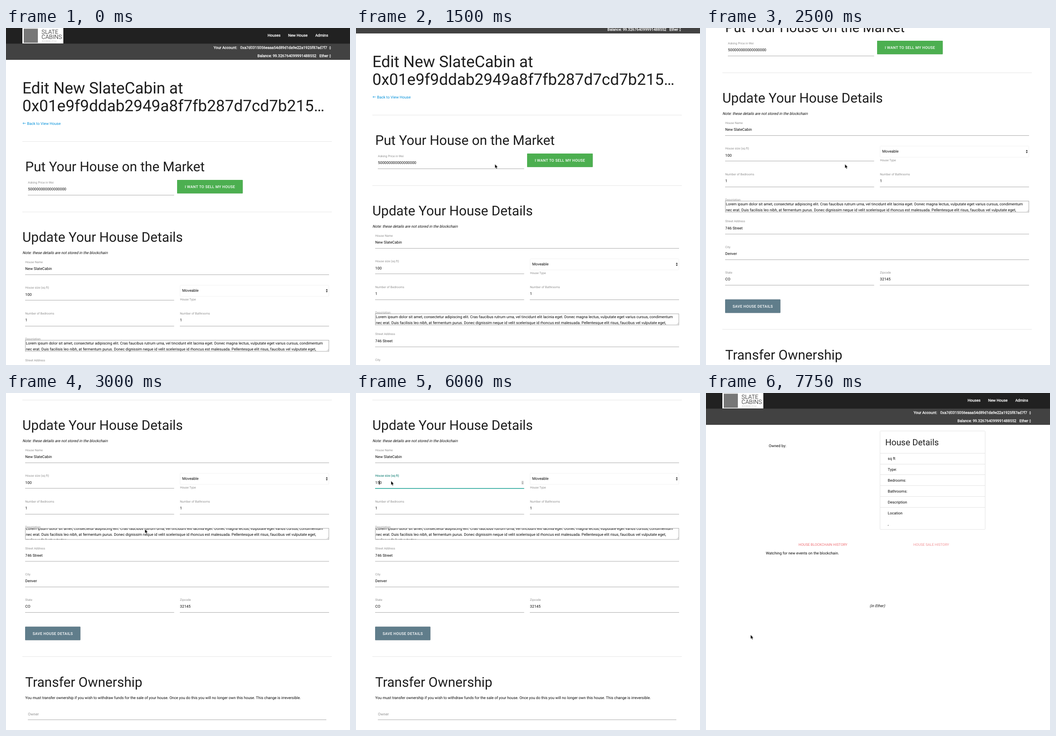
Animation of 756 by 741 pixels, one loop 8 s. Source, as an HTML page:

```html
<!DOCTYPE html>
<html lang="en">
<head>
<meta charset="utf-8">
<title>Edit house</title>
<style>
html, body { margin: 0; width: 100%; height: 100%; overflow: hidden; background: #fff; }
svg { display: block; width: 100%; height: 100%; }
text { font-family: Roboto, Arial, sans-serif; font-size: 8.333px; fill: #080808; text-rendering: geometricPrecision; white-space: pre; }
.label { font-size: 6.667px; fill: #8e8e8e; }
.hint { fill: #929292; }
.h1, .h2, .h3 { fill: #1e1e1e; }
.h1 { font-size: 35px; }
.h2 { font-size: 29.67px; }
.h3 { font-size: 19px; }
.nav { fill: #fff; stroke: #fff; stroke-width: .3px; }
.btn { fill: #fff; font-weight: 500; letter-spacing: .278px; text-anchor: middle; }
.tab { font-size: 7.78px; fill: #ee6e73; text-anchor: middle; }
.link { fill: #0290da; }
.end { text-anchor: end; }
.raised { filter: drop-shadow(0 .9px .4px rgba(0, 0, 0, .32)); }

#page, #form, #house, #pointer, #area, #focus, #caret, #zero, #five { animation: 8s step-end infinite; }
#page { animation-name: scroll; }
#form { animation-name: form; }
#house { animation-name: house; }
#pointer { animation-name: pointer; }
#area { animation-name: area; }
#focus { animation-name: focus; }
#caret { animation-name: caret; }
#zero { animation-name: zero; }
#five { animation-name: five; }

@keyframes scroll {
  0%, 96.875%, 100% { transform: translateY(0); }
  18.75% { transform: translateY(-58px); }
  21.875% { transform: translateY(-150px); }
  28.125% { transform: translateY(-238px); }
  31.25% { transform: translateY(-306px); }
  34.375% { transform: translateY(-389px); }
}
@keyframes form { 0% { opacity: 1; } 96.875%, 100% { opacity: 0; } }
@keyframes house { 0% { opacity: 0; } 96.875%, 100% { opacity: 1; } }
@keyframes area { 0% { transform: translateY(0); } 37.5%, 100% { transform: translateY(-6px); } }
@keyframes focus { 0%, 93.75%, 100% { opacity: 0; } 50% { opacity: 1; } }
@keyframes zero { 0% { opacity: 1; } 75%, 100% { opacity: 0; } }
@keyframes five { 0% { opacity: 0; } 75%, 100% { opacity: 1; } }
@keyframes caret {
  0%, 59.375%, 93.75%, 100% { opacity: 0; transform: translateX(56px); }
  53.125% { opacity: 1; transform: translateX(56px); }
  65.625%, 75%, 87.5% { opacity: 1; transform: translateX(51px); }
  71.875%, 81.25% { opacity: 0; transform: translateX(51px); }
}
@keyframes pointer {
  0% { opacity: 0; transform: translate(633px, 122px); }
  3.125% { opacity: 1; transform: translate(633px, 122px); }
  6.25% { opacity: 1; transform: translate(410px, 246px); }
  9.375% { opacity: 1; transform: translate(305.3px, 299.4px); }
  40.625% { opacity: 1; transform: translate(160px, 156px); }
  43.75% { opacity: 1; transform: translate(112px, 178px); }
  46.875% { opacity: 1; transform: translate(84px, 190px); }
  50% { opacity: 1; transform: translate(77px, 193.4px); }
  81.25% { opacity: 1; transform: translate(79px, 236px); }
  84.375% { opacity: 1; transform: translate(87px, 390px); }
  87.5% { opacity: 1; transform: translate(95px, 505px); }
  90.625%, 100% { opacity: 1; transform: translate(98px, 531.8px); }
}
</style>
</head>
<body>
<svg id="stage" viewBox="0 0 756 741"></svg>
<script>
const text = (x, y, s, cls = '') => `<text x="${x}" y="${y}" class="${cls}">${s}</text>`;
// upright letters slanted, so they keep the regular widths
const oblique = (x, y, s) => `<text transform="translate(${x} ${y}) skewX(-14)">${s}</text>`;
const rect = (x, y, w, h, fill, more = '') =>
  `<rect x="${x}" y="${y}" width="${w}" height="${h}" fill="${fill}" ${more}/>`;
const group = (id, ...parts) => `<g id="${id}">${parts.join('')}</g>`;
const rule = y => rect(36, y, 680, 1, '#e6e6e6');
const line = (x, y, right) => rect(x, y, right - x, 1, '#acacac');
const arrows = (x, y, fill) =>
  `<path fill="${fill}" d="M${x - 2} ${y - .8}h4l-2-3zM${x - 2} ${y + .8}h4l-2 3z"/>`;
const button = (x, y, w, fill, s) =>
  rect(x, y, w, 29.7, fill, 'rx="1" class="raised"') + text(x + w / 2 + .1, y + 18, s, 'btn');

// y is the row of the underline
const field = (x, y, right, label, value = '') =>
  text(x + .3, y - 25.4, label, 'label') + text(x + .3, y - 9.9, value) + line(x, y, right);

const nav = group('nav',
  rect(0, 34, 756, 36, '#424242', 'class="raised"'),
  rect(0, 0, 756, 34.4, '#212121'),
  rect(36, 0, 90, 34, '#fff'),
  rect(39, 1.5, 31, 31, '#777'),
  '<g style="font-weight:300">',
  '<text x="78" y="13" style="font-size:13px">SLATE</text>',
  '<text x="78" y="24.3" style="font-size:13px">CABINS</text></g>',
  '<text x="79" y="29.6" style="font-size:3.6px;fill:#aaa;letter-spacing:.2px">RECORDED STYLE</text>',
  text(575, 19.4, 'Houses', 'nav'),
  text(620, 19.4, 'New House', 'nav'),
  text(708, 19.4, 'Admins', 'nav end'),
  text(508, 46.3, 'Your Account:', 'nav end'),
  text(705.8, 46.3, '0xa7d0315056eaaa54d89d1da9e22a1925f87ad7f7', 'nav end'),
  arrows(712.3, 43.8, '#ddd'),
  text(682, 64.1, 'Balance: 99.326764099991488552', 'nav end'),
  text(708, 64.1, 'Ether', 'nav end'),
  arrows(712.3, 61.6, '#ddd'));

const sizeField = [
  text(42.3, 573.3, 'House size (sq ft)', 'label'),
  line(42, 598, 369.5),
  text(42.3, 588.8, '1'),
  group('zero', text(46.98, 588.8, '0')),
  group('five', text(46.98, 588.8, '5')),
  text(51.66, 588.8, '0'),
  group('focus',
    '<text x="42.3" y="573.3" class="label" style="fill:#26a69a">House size (sq ft)</text>',
    rect(42, 598, 327.5, 1.6, '#26a69a'),
    rect(363.8, 582, 4.6, 8.4, '#f0f0f0', 'rx="2.2" stroke="#bbb" stroke-width=".5"'),
    '<path d="M364.9 585.3h2.4l-1.2-1.8zM364.9 587.1h2.4l-1.2 1.8z" fill="#555"/>'),
  group('caret', rect(0, 581, 1, 10, '#222'))
].join('');

const lorem = [
  'Lorem ipsum dolor sit amet, consectetur adipiscing elit. Cras faucibus rutrum urna, vel tincidunt elit lacinia eget. Donec magna lectus, vulputate eget varius cursus, condimentum',
  'nec erat. Duis facilisis leo nibh, at fermentum purus. Donec dignissim neque id velit scelerisque id rhoncus est malesuada. Pellentesque elit risus, faucibus vel vulputate eget,',
  'malesuada luctus tortor.'
];

const description = [
  text(42.3, 685.6, 'Description', 'label'),
  rect(42.5, 686.5, 667, 24.5, '#fff', 'stroke="#adadad"'),
  '<clipPath id="inside"><path d="M43 687h666v23.5h-666z"/></clipPath><g clip-path="url(#inside)">',
  group('area', ...lorem.map((s, i) => text(43.7, 696.2 + 12.5 * i, s))),
  '</g><path d="M705 710l4-4M707.3 710l1.7-1.7" stroke="#999" stroke-width=".6"/>'
].join('');

const form = group('form',
  text(36, 144.4, 'Edit New SlateCabin at', 'h1'),
  text(36, 183, '0x01e9f9ddab2949a8f7fb287d7cd7b215…', 'h1'),
  '<path d="M43.3 209.6H37M39.2 207.5l-2.2 2.1 2.2 2.1" fill="none" stroke="#0290da" stroke-width=".8"/>',
  text(46.2, 212.6, 'Back to View House', 'link'),
  rule(249),
  text(42.3, 315.4, 'Put Your House on the Market', 'h2'),
  field(48, 367, 369.5, 'Asking Price in Wei', '500000000000000000'),
  button(376, 334, 144.3, '#4caf50', 'I WANT TO SELL MY HOUSE'),
  rule(404),
  text(36, 470.3, 'Update Your House Details', 'h2'),
  oblique(36, 497.3, 'Note: these details are not stored in the blockchain'),
  field(42, 542, 710, 'House Name', 'New SlateCabin'),
  sizeField,
  rect(382.5, 565.5, 327, 24.5, '#fff', 'rx="1" stroke="#f2f2f2"'),
  text(387.2, 580.2, 'Moveable'),
  arrows(705, 577.6, '#222'),
  text(382.4, 599.3, 'House Type', 'label'),
  field(42, 655, 369.5, 'Number of Bedrooms', '1'),
  field(382, 655, 710, 'Number of Bathrooms', '1'),
  description,
  field(42, 758.6, 710, 'Street Address', '746 Street'),
  field(42, 815, 710, 'City', 'Denver'),
  field(42, 871, 369.5, 'State', 'CO'),
  field(382, 871, 710, 'Zipcode', '32145'),
  button(42, 902.8, 121.5, '#607d8b', 'SAVE HOUSE DETAILS'),
  rule(968),
  text(42.3, 1034.6, 'Transfer Ownership', 'h2'),
  text(42.3, 1062, 'You must transfer ownership if you wish to withdraw funds for the sale of your house. Once you do this you will no longer own this house. This change is irreversible.'),
  text(48.3, 1097.8, 'Owner', 'hint'),
  line(48, 1107, 704));

const details = ['sq ft', 'Type:', 'Bedrooms:', 'Bathrooms:', 'Description', 'Location'];
const house = group('house',
  text(138, 119, 'Owned by:'),
  rect(382.5, 83.5, 231, 216.5, '#fff', 'rx="1" stroke="#e4e4e4"'),
  text(394, 115.2, 'House Details', 'h3'),
  ...details.map((s, i) =>
    rect(383, Math.round(131.6 + 23.9 * i), 230, 1, '#e4e4e4') + text(399.6, 147 + 23.9 * i, s)),
  text(399.6, 291, ','),
  text(257, 336, 'HOUSE BLOCKCHAIN HISTORY', 'tab'),
  '<g opacity=".75">' + text(495, 336, 'HOUSE SALE HISTORY', 'tab') + '</g>',
  text(131.6, 355.4, 'Watching for new events on the blockchain.'),
  oblique(359.6, 471, '(in Ether)'));

const pointer = group('pointer',
  '<path d="M0 0V8.8L2 7 3.3 10.3 5 9.6 3.7 6.4H6.4Z" fill="#000" stroke="#fff" stroke-width=".5"/>');

document.getElementById('stage').innerHTML = group('page', form, house, nav) + pointer;
</script>
</body>
</html>
```
